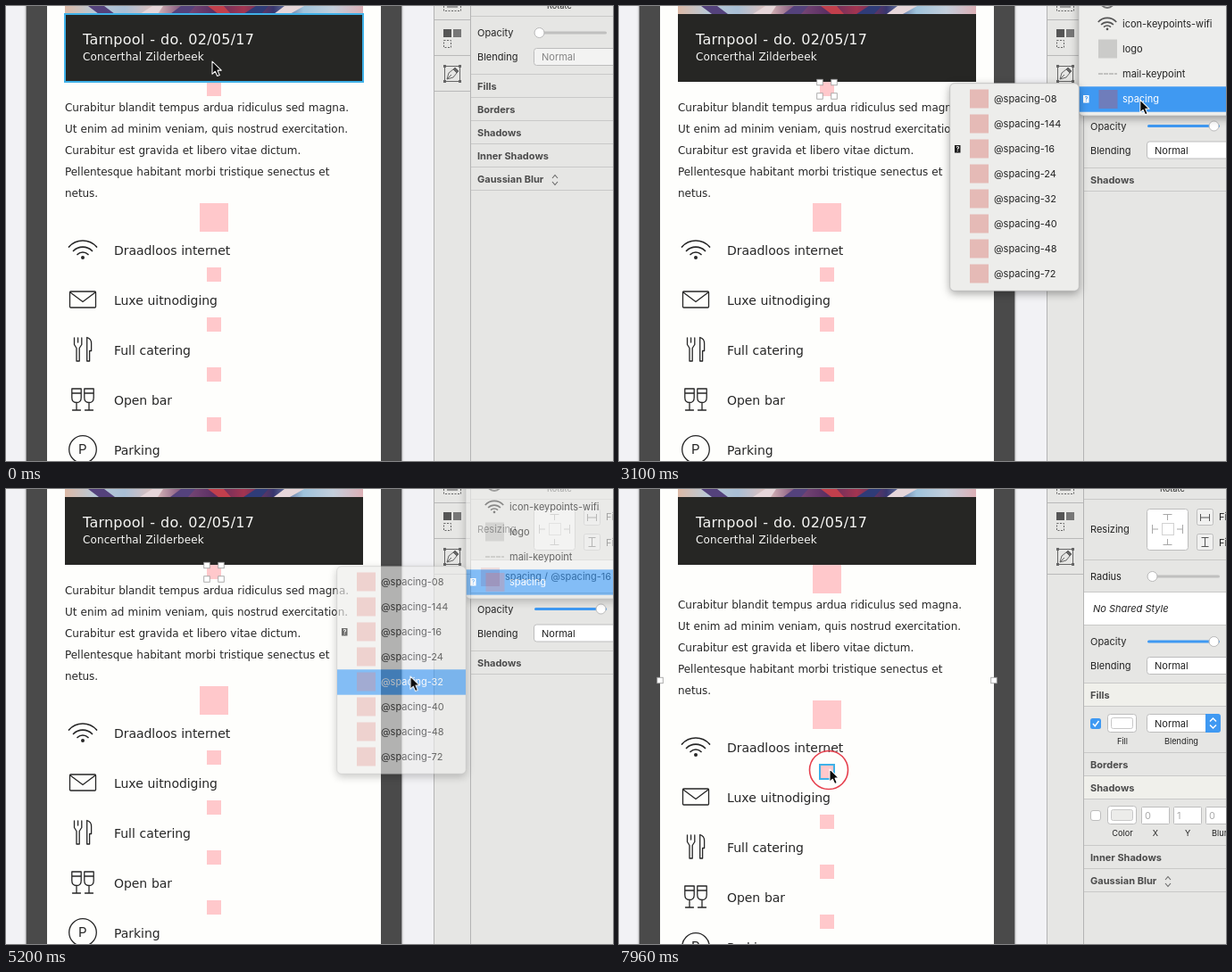
An HTML page for the animation above (8 s loop, 680x510 px).

```html
<!DOCTYPE html>
<html lang="nl">
<head>
<meta charset="utf-8">
<title>Spacing symbols</title>
<style>
html, body { margin: 0; width: 100%; height: 100%; overflow: hidden; background: #f2f2f5; }
svg { display: block; }
.page { font: 12px "DejaVu Sans", sans-serif; fill: #272727; letter-spacing: -.05px; word-spacing: .4px; }
.ui { font: 11px Inter, sans-serif; fill: #232323; }
.head { font-weight: 700; fill: #4b4b4b; }
.small { font-size: 9.2px; }
.icon { fill: none; stroke: #262626; stroke-width: 1.3; stroke-linejoin: round; stroke-linecap: round; }
.menu { filter: drop-shadow(0 3px 5px #0005); }
.device { filter: drop-shadow(0 0 1.5px #0006); }
</style>
</head>
<body>
<svg id="stage" width="680" height="510" viewBox="0 0 680 510"></svg>
<script>
const LOOP = 8000;
const PINK = '#ffc8cb', MENU_PINK = '#e5bab6', BLUE = '#3f99f2', HOVER = '#3fb1e8';

const rect = (x, y, w, h, fill, extra = '') =>
  `<rect x="${x}" y="${y}" width="${w}" height="${h}" fill="${fill}" ${extra}/>`;
const text = (x, y, str, extra = '') => `<text x="${x}" y="${y}" ${extra}>${str}</text>`;
const path = (d, extra = '') => `<path d="${d}" ${extra}/>`;
const group = (id, content, extra = '') => `<g id="${id}" ${extra}>${content}</g>`;
const rule = (y, color = '#c9c9c8') => rect(521, y, 159, 1, color);
const heading = (y, str) => text(528, y, str, 'class="head"');
const boxed = (x, y, w, h, fill = '#fff', r = 3) =>
  rect(x + .5, y + .5, w - 1, h - 1, fill, `rx="${r}" stroke="#bdbdbd"`);
const caption = (x, y, str) => text(x, y, str, 'class="small" text-anchor="middle"');

/* Artboard */
const photo = `<defs><linearGradient id="photo">
  ${['#dcb9a6', '#b9c9d6', '#a9bfd6', '#dfc0bd', '#7a4a78', '#5b2f63', '#a33450', '#37366f', '#9fc3dc', '#c3cedb', '#dcb0b6']
    .map((c, i) => `<stop offset="${i * 10}%" stop-color="${c}"/>`).join('')}
  </linearGradient></defs>` + rect(66, 0, 334, 9, 'url(#photo)') +
  path('M92 0L104 9H122L110 0ZM196 0L184 9H204L212 0Z', 'fill="#54427c"') +
  path('M150 9L164 0H176L170 9ZM300 9L312 0H334L318 9Z', 'fill="#e6d6da"') +
  path('M226 0L238 9H252L244 0Z', 'fill="#c23f4c"') + path('M266 9L280 0H294L286 9Z', 'fill="#2f3c78"');

const paragraph = [
  'Curabitur blandit tempus ardua ridiculus sed magna.',
  'Ut enim ad minim veniam, quis nostrud exercitation.',
  'Curabitur est gravida et libero vitae dictum.',
  'Pellentesque habitant morbi tristique senectus et',
  'netus.'
].map((line, i) => text(66, 118 + 24 * i, line)).join('');

const wifi = path('M-15.5-3A20.7 20.7 0 0 1 15.5-3M-10.5 1.5A14.8 14.8 0 0 1 10.5 1.5M-6 5.5A8.5 8.5 0 0 1 6 5.5') +
  '<circle cy="9" r="2" fill="currentColor" stroke="none"/>';
const glass = x => path(`M${x - 5.2}-12H${x + 5.2}V-2Q${x + 5.2} 3.5 ${x} 3.5Q${x - 5.2} 3.5 ${x - 5.2}-2ZM${x - 5.2}-7H${x + 5.2}M${x} 3.5V12M${x - 4.5} 12H${x + 4.5}`);
const items = [
  ['Draadloos internet', `<g stroke-width="1.7">${wifi}</g>`],
  ['Luxe uitnodiging', rect(-14.5, -9, 29, 18, 'none', 'rx="1"') + path('M-14-8L0 2.5L14-8')],
  ['Full catering', path('M-9.5-13V-5.5L-7-1.5V13H-3.8V-1.5L-1.2-5.5V-13M-5.4-13V-8') +
    path('M4.7 13V-13.5Q9.6-12 9.6-7V1.5H7.6V13Z')],
  ['Open bar', glass(-7) + glass(7)],
  ['Parking', '<circle r="15.3"/><text x="-5" y="5.2" font-size="15" font-family="Inter, sans-serif" fill="#262626" stroke="none">P</text>']
];
const list = items.map(([label, art], i) => {
  const y = 273 + 56 * i;
  return `<g class="icon" transform="translate(86 ${y})" color="#262626">${art}</g>` +
    text(121, y + 6, label, 'font-size="14"') +
    (i < 4 ? rect(225, y + 20, 16, 16, PINK) : '');
}).join('');

const artboard = rect(22.7, -9, 420.6, 528, '#4a4a4a', 'class="device"') +
  rect(46, 0, 374, 510, '#fefefc') + photo + rect(66, 9, 334, 76, '#262624') +
  `<g class="page">
    ${text(86, 43, 'Tarnpool - do. 02/05/17', 'font-size="16" letter-spacing=".25" fill="#f6f6f4"')}
    ${text(86, 61, 'Concerthal Zilderbeek', 'letter-spacing=".1" fill="#f6f6f4"')}
    ${rect(225, 85, 16, 16, PINK, 'id="spacer"')}
    ${group('flow', paragraph + rect(217, 221, 32, 32, PINK) + list)}
  </g>`;

/* Inspector */
const toolbar = rect(479, 0, 201, 510, '#e6e6e4') + rect(479, 0, 1, 510, '#b4b4b4') + rect(520, 0, 1, 510, '#b4b4b4') +
  [15, 55, 95].map(y => rect(480, y, 40, 1, '#b9b9b9')).join('') +
  `<g fill="none" stroke="#666">
    ${path('M490.5 0V5.5H509.5V0', 'stroke-dasharray="2 1.5"')}${rect(494, 0, 12, 2, '#999', 'stroke="none"')}
    ${rect(490, 26, 9, 9, '#555', 'stroke="none"')}${rect(501, 26, 9, 9, '#777', 'stroke="none"')}
    ${rect(490.5, 38.5, 8, 8, 'none', 'stroke-dasharray="2 1.5"')}
    ${rect(491.5, 67.5, 17, 17, 'none')}
    ${[490, 507].map(x => [66, 83].map(y => rect(x, y, 3, 3, '#666', 'stroke="none"')).join('')).join('')}
    ${path('M494 82L496 75L501 71L505 75L501 80ZM494 82L499 77', 'fill="#e6e6e4"')}
    ${path('M501 71L503 69L507 73L505 75Z', 'fill="#666"')}
  </g>`;

const slider = (y, full) => rect(592, y - 1.5, 81, 3, full ? BLUE : '#c0c0bf', 'rx="1.5"') +
  `<circle cx="${full ? 666.5 : 597.5}" cy="${y}" r="5.5" fill="#fff" stroke="#b8b8b8"/>`;
const appearance = (y, on) => text(528, y + 4, 'Opacity') + slider(y, on) +
  text(528, y + 31, 'Blending') + boxed(591, y + 17, 110, 20, on ? '#fff' : '#f3f3f2') +
  text(600, y + 31, 'Normal', on ? '' : 'fill="#858585"');
const resizing = text(528, 49, 'Resizing') + boxed(591, 22, 47, 47) +
  path('M597.5 40V50M597.5 45H604M631.5 40V50M631.5 45H625M609.5 28.5H619.5M614.5 28.5V35M609.5 62.5H619.5M614.5 62.5V56', 'stroke="#a8a8a8"') +
  rect(608.5, 38.5, 13, 13, 'none', 'stroke="#d2d2d2"') +
  boxed(647, 22, 19, 19, '#f1f1f0', 2) + boxed(647, 50, 19, 19, '#f1f1f0', 2) +
  path('M651.5 28V36M661.5 28V36M652 32H661M652.5 54.5H660.5M652.5 64.5H660.5M656.5 55V64', 'stroke="#555"') +
  text(672, 35, 'Fixed') + text(672, 64, 'Fixed') + rule(79);
const stepper = y => path(`M612 ${y - 5}l3-3.5l3 3.5M612 ${y - 1}l3 3.5l3-3.5`, 'fill="none" stroke="#666" stroke-width="1.1" transform="translate(0 2)"');
const field = (x, str) => boxed(x, 356, 32, 20, '#fff', 1) + text(x + 4, 370, str, 'fill="#aaa"');
const well = (y, fill) => boxed(547, y, 33, 21) + rect(551.5, y + 4.5, 24, 12, fill, 'rx="2" stroke="#c8c8c8"');

const panelEmpty = appearance(30, false) +
  ['Fills', 'Borders', 'Shadows', 'Inner Shadows', 'Gaussian Blur'].map((s, i) => rule(76 + 26 * i) + heading(94 + 26 * i, s)).join('') +
  rule(206) + stepper(196);

const panelSymbol = resizing + rect(521, 80, 159, 36, '#fff') + rule(116) +
  rect(532, 88, 21, 21, '#f1c5c3') + text(559, 102, 'spacing / @spacing-16', 'id="symbolName"') +
  appearance(134.5, true) + rule(181) + heading(199, 'Shadows') + rule(207);

const panelPage = resizing + text(528, 102, 'Radius') + slider(98, false) +
  rule(115) + rect(521, 116, 159, 36, '#fff') + rule(152) +
  text(531, 138, 'No Shared Style', 'font-style="italic"') + appearance(171, true) +
  rule(217) + rect(521, 218, 159, 25, '#f0f0eb') + heading(235, 'Fills') + rule(243) +
  rect(528, 257, 12, 12, BLUE, 'rx="2.5"') + path('M531 263l2.2 2.8L537.5 260', 'fill="none" stroke="#fff" stroke-width="1.5"') +
  well(252, '#fff') + boxed(591, 252, 83, 21) + text(600, 267, 'Normal') +
  path('M657 252H671Q674 252 674 255V270Q674 273 671 273H657Z', `fill="${BLUE}"`) +
  path('M662 260.5l3.5-3.5l3.5 3.5M662 264.5l3.5 3.5l3.5-3.5', 'fill="none" stroke="#fff" stroke-width="1.5"') +
  caption(564, 286, 'Fill') + caption(630, 286, 'Blending') +
  rule(295) + heading(313, 'Borders') + rule(321) +
  rect(521, 322, 159, 25, '#f0f0eb') + heading(339, 'Shadows') + rule(347) +
  boxed(528, 360, 12, 12, '#fff', 2.5) + well(355, '#ececea') + field(585, '0') + field(621, '1') + field(657, '0') +
  caption(564, 389, 'Color') + caption(601, 389, 'X') + caption(637, 389, 'Y') + text(664, 389, 'Blur', 'class="small"') +
  rule(399) + heading(417, 'Inner Shadows') + rule(425) + heading(443, 'Gaussian Blur') + stepper(441) + rule(451);

/* Popup menus */
const missing = (x, y, back, front) => rect(x, y, 6.5, 8.5, back) +
  text(x + 1.4, y + 7, '?', `font-size="7" font-weight="700" fill="${front}"`);
const mainMenu = rect(515, -20, 190, 143, '#ededeb', 'rx="5" stroke="#b5b5b5" stroke-width=".7"') +
  '<circle cx="547" cy="-6" r="8" fill="none" stroke="#777" stroke-width="2"/>' +
  `<g transform="translate(547 20) scale(.66)" fill="none" stroke="#555" stroke-width="2.4" color="#555">${wifi}</g>` +
  text(564, 24, 'icon-keypoints-wifi') +
  rect(537, 37.5, 21, 21, '#cbcbc9') + text(564, 52, 'logo') +
  path('M537 76H558', 'stroke="#b4b4b3" stroke-width="1.3" stroke-dasharray="5 1"') + text(564, 80, 'mail-keypoint') +
  rect(515.3, 90.3, 165, 28.4, BLUE) + missing(520, 100, '#fff', BLUE) +
  rect(537.5, 94, 21, 21, '#6f7dbb') + text(564, 108, 'spacing', 'fill="#fff"');
const sizes = ['08', '144', '16', '24', '32', '40', '48', '72'];
const subMenu = rect(370.7, 86.7, 144.6, 232.6, '#ededeb', 'rx="5" stroke="#b5b5b5" stroke-width=".7"') +
  rect(371, 90.3, 144, 28.4, BLUE, 'id="mark"') +
  sizes.map((s, i) => rect(393, 93.5 + 28 * i, 21, 21, MENU_PINK, 'class="swatch"') +
    text(420, 108 + 28 * i, '@spacing-' + s, 'class="size"')).join('') + missing(376, 156, '#1c1c1c', '#fff');

const handle = (x, y) => rect(x - 3.25, y - 3.25, 6.5, 6.5, '#fff', 'stroke="#999" stroke-width=".8"');

const stage = document.getElementById('stage');
stage.innerHTML = rect(0, 0, 680, 510, '#f2f2f5') + artboard +
  rect(0, 0, 0, 0, 'none', `id="hover" stroke="${HOVER}" stroke-width="2"`) +
  group('handles', '') + group('pageHandles', handle(46, 214.5) + handle(420, 214.5)) +
  `<g class="ui">${toolbar}${text(606, 3, 'Rotate', 'class="small"')}${rule(11)}
    ${group('empty', panelEmpty)}${group('symbol', panelSymbol)}${group('page', panelPage)}
    ${group('menus', group('main', mainMenu, 'class="menu"') + group('sub', subMenu, 'class="menu"'))}</g>` +
  '<circle id="ring" r="21.5" fill="none" stroke="#e6404e" stroke-width="1.6"/>' +
  group('cursor', path('M0 0V15.5L3.6 12.2L6.2 18L9 16.8L6.5 11H11.2Z', 'transform="scale(.92)" fill="#0b0b0b" stroke="#fff" stroke-width="1.1" stroke-linejoin="round"'));

const el = {};
stage.querySelectorAll('[id]').forEach(node => el[node.id] = node);
const sizeLabels = [...stage.querySelectorAll('.size')];
const swatches = [...stage.querySelectorAll('.swatch')];

/* Timeline */
const track = [
  [0, 231, 62], [550, 236, 93], [1360, 236, 93], [1820, 597, 102], [2300, 597, 102], [3000, 585, 105],
  [3830, 556, 109], [3960, 554, 109], [4250, 490, 112], [4660, 453, 210], [5530, 453, 210],
  [5900, 125, 248], [6900, 125, 248], [7780, 236, 314], [LOOP, 236, 314]
];
const clicks = [720, 1850, 4760, 5960, 7900];
const hovers = [
  [0, 330, 66, 9, 334, 76],
  [330, 760, 225, 85, 16, 16],
  [1470, 1600, 46, -5, 374, 520],
  [5600, 6000, 46, -5, 374, 520],
  [7240, 7640, 66, 269, 334, 40],
  [7640, LOOP, 225, 309, 16, 16]
];
const SELECT = 780, OPEN = 2000, OPEN_SUB = 2520, FADE = 5130, SWAP = 5420, SELECT_PAGE = 6020;

const clamp = v => Math.max(0, Math.min(1, v));
const show = (node, on) => node.setAttribute('display', on ? 'inline' : 'none');
const place = (node, x, y, w, h) =>
  Object.entries({ x, y, width: w, height: h }).forEach(([k, v]) => node.setAttribute(k, v));

function cursorAt(t) {
  const i = track.findIndex(k => k[0] > t);
  const [t0, x0, y0] = track[i - 1], [t1, x1, y1] = track[i];
  const p = (t - t0) / (t1 - t0), e = p * p * (3 - 2 * p);
  return [x0 + (x1 - x0) * e, y0 + (y1 - y0) * e];
}

function render(t) {
  const [x, y] = cursorAt(t);
  el.cursor.setAttribute('transform', `translate(${x} ${y})`);

  const click = clicks.find(c => t >= c && t < c + 420);
  show(el.ring, click !== undefined);
  if (click !== undefined) {
    el.ring.setAttribute('transform', `translate(${x - 1} ${y + 1})`);
    el.ring.setAttribute('opacity', clamp((t - click) / 50) * clamp((click + 420 - t) / 140));
  }

  const hover = hovers.find(h => t >= h[0] && t < h[1]);
  show(el.hover, hover);
  if (hover) place(el.hover, ...hover.slice(2));

  const swapped = t >= SWAP, size = swapped ? 32 : 16, left = 233 - size / 2;
  place(el.spacer, left, 85, size, size);
  el.flow.setAttribute('transform', `translate(0 ${swapped ? 16 : 0})`);
  el.symbolName.textContent = 'spacing / @spacing-' + size;

  const symbolOn = t >= SELECT && t < SELECT_PAGE;
  show(el.empty, t < SELECT);
  show(el.symbol, symbolOn);
  show(el.page, t >= SELECT_PAGE);
  show(el.pageHandles, t >= SELECT_PAGE);
  show(el.handles, symbolOn);
  el.handles.innerHTML = [left, left + size].map(hx => handle(hx, 85.5) + handle(hx, 85 + size)).join('');

  show(el.menus, t >= OPEN && t < FADE + 200);
  el.menus.setAttribute('opacity', 1 - clamp((t - FADE) / 200));
  show(el.sub, t >= OPEN_SUB);
  const row = x < 515 && t < SWAP ? Math.floor((y - 90.5) / 28) : -1;
  show(el.mark, row >= 0);
  el.mark.setAttribute('y', 90.3 + 28 * row);
  sizeLabels.forEach((label, i) => label.setAttribute('fill', i === row ? '#fff' : '#232323'));
  swatches.forEach((s, i) => s.setAttribute('fill', i === row ? '#6f7dbb' : MENU_PINK));
}

const start = performance.now();
function tick() {
  render((performance.now() - start) % LOOP);
  requestAnimationFrame(tick);
}
tick();
</script>
</body>
</html>
```
